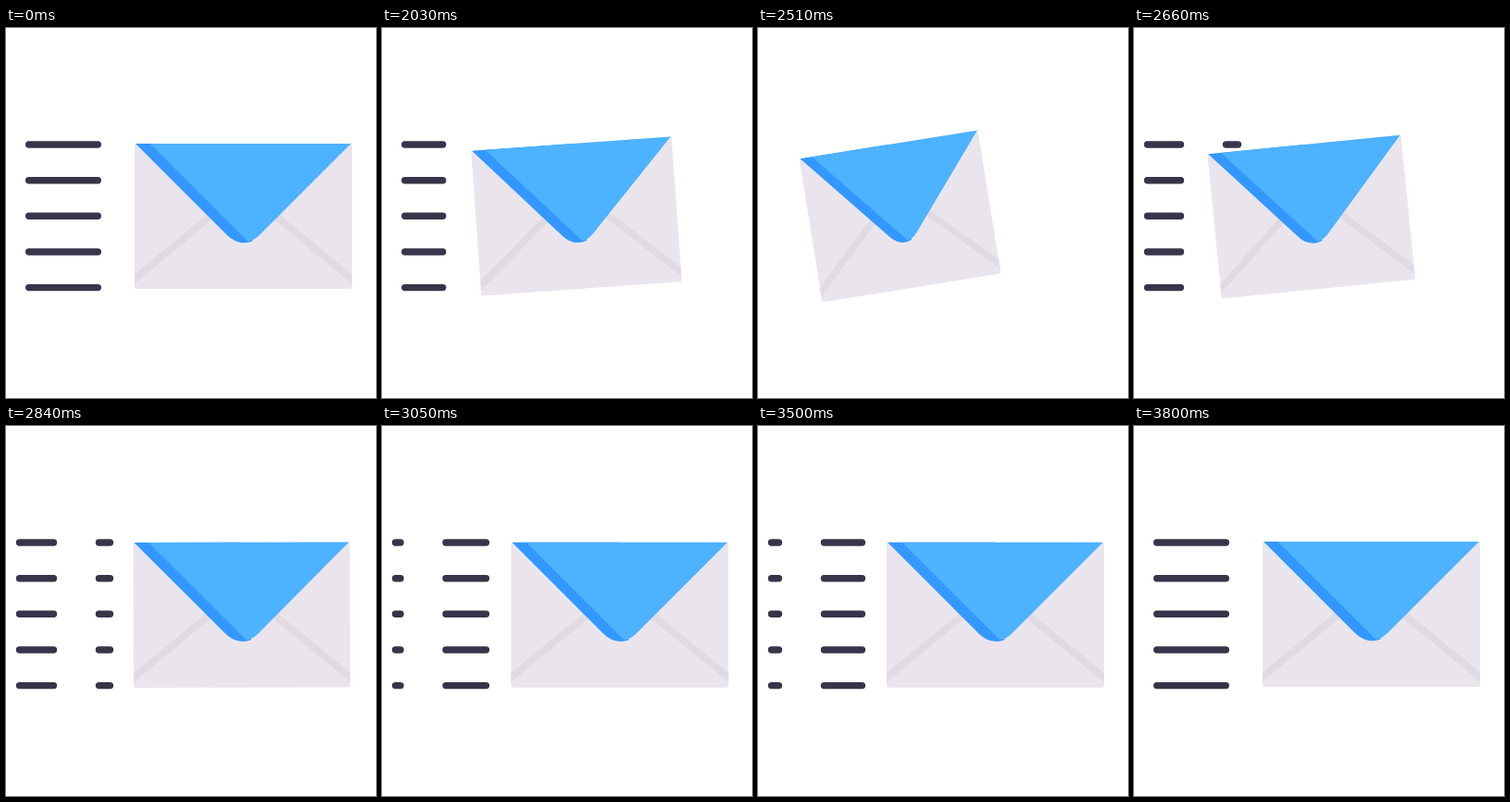
These frames come from a looping animation (400 by 400 pixels, 3830 ms). An HTML page:

```html
<!DOCTYPE html>
<html lang="en">
<head>
<meta charset="utf-8">
<title>Envelope</title>
<style>
  html, body { margin: 0; width: 100%; height: 100%; overflow: hidden; background: #fff; }
  svg { display: block; width: 100vw; height: 100vh; }
</style>
</head>
<body>
<svg viewBox="0 0 400 400">
  <clipPath id="body"><rect x="-117.5" y="-78.5" width="235" height="157" rx="2"/></clipPath>
  <path id="lines" fill="none" stroke="#393449" stroke-width="7.4" stroke-linecap="round"/>
  <g id="envelope">
    <g clip-path="url(#body)">
      <rect x="-118" y="-79" width="236" height="158" fill="#eae5ec"/>
      <path d="M-121 70.5L-17.5 -14.4M121 70.5L17.5 -14.4" stroke="#e0dbe3" stroke-width="7.8"/>
    </g>
    <path fill="#3398fd" d="M-116.5 -78.5H0V28A25 25 0 0 1 -17.7 20.3Z"/>
    <path fill="#3398fd" d="M-10 20H10V27A25 25 0 0 1 -10 26Z"/>
    <path fill="#4db2ff" d="M-101 -78.5H116.5L17.7 20.3A25 25 0 0 1 5 27.2Z"/>
  </g>
</svg>
<script>
const LOOP = 3830, START = 2000, STEP = 30, LAST = 60;
const ROWS = [126, 164.7, 203.3, 242, 280.6];
const TRACK = { x: 14.5, length: 98, dash: 49, speed: 32.5 };
const FLOW_FROM = 20;
const lines = document.getElementById('lines');
const envelope = document.getElementById('envelope');

const clamp = v => Math.min(1, Math.max(0, v));
const smooth = v => v * v * (3 - 2 * v);
const mod = (a, b) => ((a % b) + b) % b;
const pullBack = step => 1 - Math.pow(0.55, step);

function drawLines(segments) {
  lines.setAttribute('d', ROWS.map(y =>
    segments.map(([from, to]) => `M${from} ${y}H${to}`).join('')).join(''));
}

// A dash that runs left along the track and wraps around its ends.
function flowingSegments(step) {
  const { x, length, dash, speed } = TRACK;
  const start = mod(86 - speed * (step - 28), length);
  const end = start + dash;
  const segments = [[x + start, x + Math.min(end, length)]];
  if (end > length) segments.push([x, x + end - length]);
  return segments;
}

function restingSegments(step) {
  const pulled = pullBack(step);
  return pulled > 0.99 ? [] : [[24.7, 24.7 + 74.6 * (1 - pulled)]];
}

function render(time) {
  const elapsed = mod(time, LOOP) - START;
  const step = Math.max(0, Math.floor(elapsed / STEP)) % LAST;

  drawLines(step < FLOW_FROM ? restingSegments(step) : flowingSegments(step));

  const pull = pullBack(step) * (1 - smooth(clamp((step - 17) / 12)));
  const shake = step > FLOW_FROM ? 1 : 0;
  const angle = (step - 41) * 50 * Math.PI / 180;
  const x = 256.5 - 102.9 * pull + shake * Math.cos(angle);
  const y = 203.5 + 0.8 * shake * Math.sin(angle);
  envelope.setAttribute('transform',
    `translate(${x} ${y}) rotate(${-9.08 * pull}) scale(${1 - 0.168 * pull} 1)`);
}

function tick(now) {
  render(now);
  requestAnimationFrame(tick);
}
render(0);
requestAnimationFrame(tick);
</script>
</body>
</html>
```
